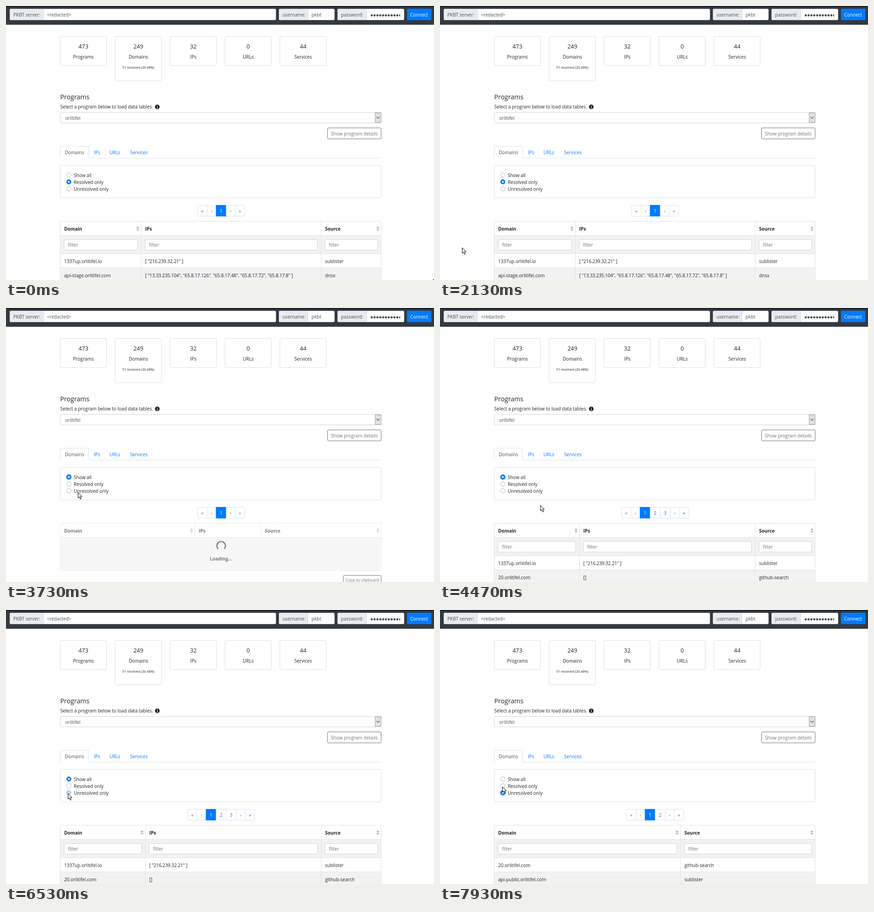
Animation, 935 px wide and 599 px high, one loop 8000 ms. Source, as an HTML page:

```html
<!DOCTYPE html>
<html lang="en">
<head>
<meta charset="utf-8">
<title>Domain dashboard</title>
<style>
  html, body { margin: 0; width: 100%; height: 100%; overflow: hidden; background: #fff; }
  svg { display: block; width: 935px; height: 599px; }
  text { font: 10.1px "Open Sans", "Noto Sans", sans-serif; fill: #212529; white-space: pre; }
  .mid { text-anchor: middle; }
  .num { font-size: 12.5px; }
  .tiny { font-size: 7.3px; }
  .small { font-size: 8.95px; }
  .head { font-size: 14.2px; }
  .bold { font-weight: 700; }
  .ips { letter-spacing: -.13px; }
  .form { fill: #495057; }
  .muted { fill: #6c757d; }
  .link { fill: #007bff; }
  .white { fill: #fff; }
  .busy { opacity: .6; }
</style>
</head>
<body>
<svg id="stage" viewBox="0 0 935 599" xmlns="http://www.w3.org/2000/svg"></svg>
<script>
const LINE = '#dee2e6', FIELD = '#ced4da', CARD = '#dfdfdf', GREY = '#6c757d', BLUE = '#007bff';
const LEFT = 118.5, RIGHT = 820;
const SITE = 'orlitifel';

const esc = s => s.replace(/&/g, '&amp;').replace(/</g, '&lt;').replace(/>/g, '&gt;');
const text = (x, y, s, cls = '') => `<text x="${x}" y="${y}" class="${cls}">${esc(s)}</text>`;
const box = (x1, y1, x2, y2, stroke = 'none', fill = '#fff', r = 2.5) =>
  `<rect x="${x1}" y="${y1}" width="${x2 - x1}" height="${y2 - y1}" rx="${r}" fill="${fill}" stroke="${stroke}"/>`;
const path = (d, stroke = LINE, fill = 'none', w = 1) =>
  `<path d="${d}" stroke="${stroke}" fill="${fill}" stroke-width="${w}"/>`;
const circle = (x, y, r, fill, extra = '') => `<circle cx="${x}" cy="${y}" r="${r}" fill="${fill}" ${extra}/>`;

function inputGroup(x, split, end, label, value) {
  return box(x, 6.5, end, 30.5, FIELD) +
    path(`M${split} 6.5H${x + 2}q-2 0-2 2V28.5q0 2 2 2H${split}Z`, FIELD, '#e9ecef') +
    text(x + 7.5, 23, label, 'form') + text(split + 8, 23, value, 'form');
}

function navbar() {
  let s = box(0, 0, 935, 41, 'none', '#343a40', 0) + box(0, 0, 935, 2, 'none', '#15181c', 0);
  s += inputGroup(8.5, 81.5, 589.5, 'PKBT server:', '<redacted>');
  s += inputGroup(596.5, 659.5, 717.5, 'username:', 'pkbt');
  s += inputGroup(724.5, 787.5, 869.5, 'password:', '');
  s += '<clipPath id="pw"><rect x="790" y="8" width="71" height="20"/></clipPath><g clip-path="url(#pw)">';
  for (let i = 0; i < 11; i++) s += circle(799 + 6.2 * i, 20.5, 2.4, '#495057');
  return s + '</g>' + box(876, 6, 929.5, 31, 'none', BLUE) + text(902.5, 23, 'Connect', 'mid white');
}

function cards() {
  const items = [['473', 'Programs'], ['249', 'Domains'], ['32', 'IPs'], ['0', 'URLs'], ['44', 'Services']];
  return items.map(([n, label], i) => {
    const x = LEFT + 120 * i, c = x + 50.7;
    return box(x, 66.5, x + 101, i === 1 ? 163.5 : 130.5, CARD) +
      text(c, 92.5, n, 'mid num') + text(c, 115, label, 'mid');
  }).join('') + text(289, 136.5, '51 resolved (20.48%)', 'mid tiny');
}

function programs() {
  return text(118.5, 204, 'Programs', 'head') +
    text(118.5, 224, 'Select a program below to load data tables.') +
    circle(330.5, 220.5, 5, '#16181b') +
    path('M329.4 219.6h1.4v3.4M329.2 223.2h2.9', '#fff') + circle(330.6, 217.8, .8, '#fff') +
    box(LEFT, 232.5, 819.5, 255.5, FIELD) + text(129.5, 249, SITE, 'form') +
    box(806.5, 233.5, 819.5, 254.5, '#a3a3a3', '#e1e1e1', 0) +
    path('M809.5 242.5l3.3 3.3l3.3-3.3', '#444', 'none', 1.1) +
    box(702.5, 266.5, 819.5, 290.5, GREY) + text(761, 283, 'Show program details', 'mid muted');
}

function tabs() {
  return path(`M181 332.5H${RIGHT}`) + path('M118.5 333V309q0-2.5 2.5-2.5H178q2.5 0 2.5 2.5V332.5') +
    text(149.5, 324, 'Domains', 'mid form') +
    text(192, 324, 'IPs', 'link') + text(226, 324, 'URLs', 'link') + text(271, 324, 'Services', 'link');
}

function radios() {
  return box(LEFT, 348.5, 819.5, 419.5, CARD) +
    ['Show all', 'Resolved only', 'Unresolved only'].map((label, i) => {
      const y = 369.5 + 15 * i;
      return circle(137.3, y, 7.2, '#bfdeff', `id="ring${i}"`) + circle(137.3, y, 4.9, '#fff', `id="radio${i}"`) +
        circle(137.3, y, 2, '#fff', `id="dot${i}"`) + text(148, y + 4.5, label);
    }).join('');
}

function pager(pages) {
  const nums = Array.from({ length: pages }, (_, i) => String(i + 1));
  const marks = ['«', '‹', ...nums, '›', '»'];
  const widths = [21, 19.5, ...nums.map(() => 22), 19.5, 21];
  const total = widths.reduce((a, b) => a + b);
  const start = 470 - total / 2;
  let x = start, s = box(start, 435.5, start + total, 459.5, LINE);
  marks.forEach((m, i) => {
    const w = widths[i], active = m === '1';
    if (active) s += box(x - .5, 435, x + w, 460, 'none', BLUE, 0);
    else if (i) s += path(`M${x} 435.5V459.5`);
    const cls = active ? 'white' : i < 2 || pages === 1 ? 'muted' : 'link';
    s += text(x + w / 2, 452, m, 'mid ' + cls);
    x += w;
  });
  return s;
}

// Column edges, titles and header rules shared by both table modes
function header(edges, titles) {
  return titles.map((title, i) => {
    const x = edges[i + 1] - 7.5;
    return text(edges[i] + 8.5, 491, title, 'bold') + (title === 'IPs' ? '' :
      path(`M${x - 3.3} 485.6l3.3-4l3.3 4ZM${x - 3.3} 487.6l3.3 4l3.3-4Z`, 'none', '#b0b0b0'));
  }).join('');
}

function table(edges, titles, rows) {
  let s = box(LEFT, 501.5, RIGHT, 542, 'none', '#f2f2f2', 0) + box(LEFT, 572.5, RIGHT, 600, 'none', '#f2f2f2', 0);
  s += path(`M${LEFT} 600V470.5H819.5V600` + [501.5, 541.5, 572.5].map(y => `M${LEFT} ${y}H${RIGHT}`).join('') +
    edges.slice(1, -1).map(x => `M${x} 470.5V600`).join(''));
  s += header(edges, titles);
  titles.forEach((title, i) => {
    const x = edges[i] + 8.5;
    s += box(x, 510.5, edges[i + 1] - 8, 533.5, FIELD) + text(x + 8.5, 526, 'filter', 'muted');
    rows.forEach((row, j) => s += text(x, 562 + 31 * j, row[i], title === 'IPs' ? 'ips' : ''));
  });
  return s;
}

function loading(edges, titles) {
  return '<g class="busy">' + box(LEFT, 501.5, RIGHT, 573, 'none', '#f2f2f2', 0) +
    path(`M${LEFT} 470.5H819.5V573.5H${LEFT}ZM${LEFT} 501.5H${RIGHT}` +
      edges.slice(1, -1).map(x => `M${x} 470.5V501.5`).join('')) +
    header(edges, titles) +
    '<g class="spin">' + path('M6.6 6.6A9.4 9.4 0 1 1 6.6 -6.6', '#30343a', 'none', 2.7) + '</g>' +
    text(469.5, 551.5, 'Loading...', 'mid bold') + '</g>' +
    box(737, 584.5, 819.5, 605, GREY) + text(778.3, 597.5, 'Copy to clipboard', 'mid small muted');
}

const ALL = ['Domain', 'IPs', 'Source'], SHORT = ['Domain', 'Source'];
const first = [`1337up.${SITE}.io`, '[ "216.239.32.21" ]', 'sublister'];
const views = [
  { from: 0, sel: 1, html: pager(1) + table([LEFT, 295.5, 688.5, RIGHT], ALL, [first,
    [`api-stage.${SITE}.com`, '[ "13.33.235.104", "65.8.17.126", "65.8.17.48", "65.8.17.72", "65.8.17.8" ]', 'dnsx']]) },
  { from: 2866, sel: 0, spin: 2800, html: pager(1) + loading([LEFT, 412.5, 557, RIGHT], ALL) },
  { from: 3933, sel: 0, html: pager(3) + table([LEFT, 304.5, 688.5, RIGHT], ALL, [first,
    [`20.${SITE}.com`, '[]', 'github-search']]) },
  { from: 6600, sel: 2, spin: 6638, html: pager(1) + loading([LEFT, 488.5, RIGHT], SHORT) },
  { from: 7600, sel: 2, html: pager(2) + table([LEFT, 525.5, RIGHT], SHORT, [
    [`20.${SITE}.com`, 'github-search'], [`api-public.${SITE}.com`, 'sublister']]) }
];

const stage = document.getElementById('stage');
stage.innerHTML = box(0, 0, 935, 599, 'none', '#fff', 0) + navbar() + cards() + programs() + tabs() + radios() +
  views.map(v => `<g class="view">${v.html}</g>`).join('') +
  '<g id="cursor">' + path('M.5 .5V12.4L3.2 9.9L5.4 14.9L7.4 14L5.3 9.2H9Z', '#000', '#fff') + '</g>';

const groups = [...stage.querySelectorAll('.view')];
const spinners = groups.map(g => g.querySelector('.spin'));
const cursor = document.getElementById('cursor');
const ring = [], radio = [], dot = [];
for (let i = 0; i < 3; i++) {
  ring[i] = document.getElementById('ring' + i);
  radio[i] = document.getElementById('radio' + i);
  dot[i] = document.getElementById('dot' + i);
}

// Pointer stops: time, x, y
const stops = [
  [0, 933, 597], [67, 933, 597], [333, 760, 520], [600, 420, 425], [733, 263, 392], [933, 343, 427],
  [1267, 249.5, 284.5], [1467, 190, 211], [1667, 166, 270], [1800, 174, 323], [2333, -10, 592], [2400, -10, 592],
  [2733, 161, 370.5], [2867, 161, 370.5], [3267, 160, 390], [3733, 157, 402.5], [4133, 190, 410],
  [4467, 219, 431], [5000, 135, 400.5], [5133, 135, 387], [5200, 135, 387], [5333, 140, 416], [5400, 140, 416],
  [5533, 137, 408.5], [5600, 137, 408.5], [5733, 137, 404], [6133, 137, 404], [6333, 135, 401], [6600, 135, 401],
  [6933, 137, 390], [7200, 138, 384.5], [7533, 139, 378], [7800, 136, 386], [8000, 136, 386]
];

const slope = (i, k) => (stops[i + 1][k] - stops[i][k]) / (stops[i + 1][0] - stops[i][0]);

// Flat at turning points, so the pointer never overshoots a stop
function tangent(i, k) {
  if (i === 0 || i === stops.length - 1) return 0;
  const a = slope(i - 1, k), b = slope(i, k);
  return a * b > 0 ? 2 * a * b / (a + b) : 0;
}

function pointer(t, k) {
  let i = 0;
  while (i < stops.length - 2 && stops[i + 1][0] <= t) i++;
  const [p, q] = [stops[i], stops[i + 1]], d = q[0] - p[0], u = (t - p[0]) / d, v = 1 - u;
  return p[k] * v * v * (1 + 2 * u) + q[k] * u * u * (3 - 2 * u) +
    d * u * v * (v * tangent(i, k) - u * tangent(i + 1, k));
}

const within = (t, a, b) => t >= a && t < b;

function render(t) {
  const now = views.filter(v => v.from <= t).length - 1, view = views[now];
  groups.forEach((g, i) => g.style.display = i === now ? '' : 'none');
  if (view.spin) {
    const angle = (t - view.spin) / 750 * 360;
    spinners[now].setAttribute('transform', `translate(470 520) rotate(${angle})`);
  }
  const pressed = within(t, 2730, 2866) ? 0 : within(t, 6466, 6600) ? 2 : -1;
  const glow = [within(t, 2866, 5866) ? 1 : within(t, 5866, 5933) ? .5 : 0, 0, t >= 6600 ? 1 : 0];
  for (let i = 0; i < 3; i++) {
    const on = i === view.sel, down = i === pressed;
    ring[i].setAttribute('opacity', glow[i]);
    radio[i].setAttribute('fill', on ? BLUE : down ? '#b3d7ff' : '#fff');
    radio[i].setAttribute('stroke', on ? BLUE : down ? '#9bb9dc' : '#adb5bd');
    dot[i].setAttribute('opacity', on ? 1 : 0);
  }
  cursor.setAttribute('transform', `translate(${Math.round(pointer(t, 1))} ${Math.round(pointer(t, 2))})`);
}

const STEP = 1000 / 15;
function tick() {
  const t = performance.now() % 8000;
  render(Math.floor((t + 4) / STEP) * STEP % 8000 + .01);
  requestAnimationFrame(tick);
}
tick();
</script>
</body>
</html>
```
